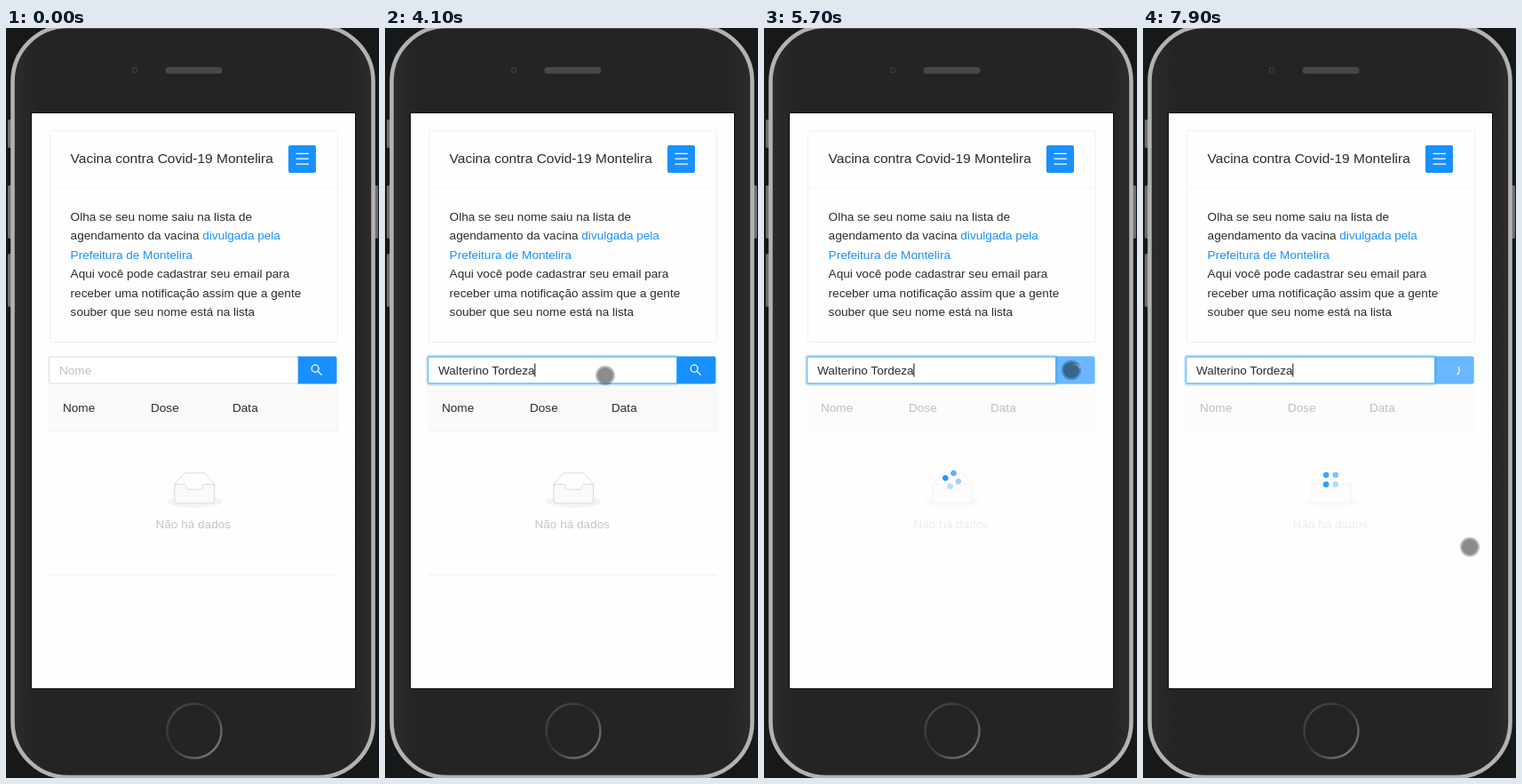
Animation, 420 px wide and 844 px high, one loop 8000 ms. Source, as an HTML page:

```html
<!DOCTYPE html>
<html lang="pt-BR">
<head>
<meta charset="utf-8">
<title>Vacina</title>
<style>
  html, body { margin: 0; width: 100%; height: 100%; overflow: hidden; background: #16181a; }
  svg { display: block; width: 420px; height: 844px; }
  text { font: 13.59px "Liberation Sans", Arial, sans-serif; fill: #2b2b2b; white-space: pre; }
  .title { font-size: 15.53px; }
  .link { fill: #1890ff; }
  .hint { fill: #bfbfbf; }
  .line { fill: none; stroke: #f0f0f0; }
  .icon { fill: none; stroke: #fff; stroke-width: 1.3; }
</style>
</head>
<body>
<svg viewBox="0 0 420 844">
  <defs>
    <linearGradient id="bezel">
      <stop offset="0" stop-color="#2c2c2c"/><stop offset=".07" stop-color="#242424"/>
      <stop offset=".93" stop-color="#242424"/><stop offset="1" stop-color="#2c2c2c"/>
    </linearGradient>
    <linearGradient id="ring" x1="0" y1="0" x2="1" y2="1">
      <stop offset="0" stop-color="#505050"/><stop offset=".42" stop-color="#303030"/>
      <stop offset=".6" stop-color="#4a4a4a"/><stop offset="1" stop-color="#8a8a8a"/>
    </linearGradient>
  </defs>

  <!-- phone -->
  <g fill="#6f6f6f">
    <rect x="2" y="103" width="5" height="32" rx="2"/>
    <rect x="2" y="177" width="5" height="60" rx="2"/>
    <rect x="2" y="254" width="5" height="60" rx="2"/>
    <rect x="414" y="177" width="5" height="60" rx="2"/>
  </g>
  <rect x="7.5" y="-2" width="406" height="845" rx="62" fill="url(#bezel)" stroke="#b2b2b2" stroke-width="4.6"/>
  <circle cx="145" cy="47.5" r="3.5" fill="#383838"/><circle cx="145" cy="47.5" r="1.5" fill="#1c1c1c"/>
  <rect x="179.5" y="44" width="64" height="7.5" rx="3.7" fill="#474747"/>
  <circle cx="212" cy="791" r="30.5" fill="none" stroke="url(#ring)" stroke-width="2.4"/>
  <rect x="28" y="95" width="366" height="649" fill="#0b0b0b"/>
  <rect x="29" y="96" width="364" height="647" fill="#fefefe"/>

  <!-- card -->
  <rect class="line" x="49.5" y="115.5" width="324" height="238" rx="2"/>
  <path class="line" d="M50 179.5H373" stroke-opacity=".6"/>
  <text class="title" x="72.6" y="152">Vacina contra Covid-19 Montelira</text>
  <rect x="318" y="132" width="31" height="31" rx="2" fill="#1890ff"/>
  <path class="icon" d="M326.5 141.3h14.4m-14.4 5.9h14.4m-14.4 5.9h14.4"/>
  <g id="intro"></g>

  <!-- table -->
  <g id="table">
    <rect x="48" y="402" width="327" height="51.5" fill="#f9f9f9"/>
    <path class="line" d="M48 453.5H375M48 615.5H374"/>
    <text x="64" y="432">Nome</text>
    <text x="163" y="432">Dose</text>
    <text x="255" y="432">Data</text>
    <g transform="translate(181.3 500.9) scale(.97)" stroke="#d9d9d9">
      <ellipse cx="32" cy="33" rx="32" ry="7" fill="#f3f3f3" stroke="none"/>
      <path fill="#fefefe" d="M55 12.8L44.9 1.3Q44 0 42.9 0H21.1Q20 0 19.1 1.3L9 12.8V22H55Z"/>
      <path fill="#fafafa" d="M41.6 15.9Q41.8 13 43.8 13H55V31Q55 35 52 35H12Q9 35 9 31V13H20.2Q22.4 13 22.4 16T24.6 18.9H39.4Q41.6 18.9 41.6 15.9Z"/>
    </g>
    <text x="168.5" y="563" style="fill:#c4c4c4">Não há dados</text>
  </g>
  <g id="dots" fill="#1890ff"></g>

  <!-- search -->
  <path d="M328 369.5H370.5a2 2 0 0 1 2 2V398.5a2 2 0 0 1-2 2H328Z" fill="#1890ff"/>
  <path id="veil" d="M328 369.5H370.5a2 2 0 0 1 2 2V398.5a2 2 0 0 1-2 2H328Z" fill="#fff"/>
  <path id="lens" class="icon" d="M352.2 383.2a4 4 0 1 0-8 0a4 4 0 1 0 8 0M351.2 386.2L355.6 390.6"/>
  <path id="arc" class="icon" d="M350 378.8A6.2 6.2 0 0 1 356.2 385" stroke-width="1.1"/>
  <rect x="48.5" y="370" width="280" height="30" rx="1.5" fill="#fff" stroke="#dcdcdc"/>
  <g id="focus" fill="none">
    <rect x="47.5" y="369" width="282" height="32" rx="2.5" stroke="#1890ff" stroke-opacity=".22" stroke-width="3"/>
    <rect x="48.5" y="370" width="280" height="30" rx="1.5" stroke="#52b2ff"/>
  </g>
  <text id="hint" class="hint" x="60" y="390">Nome</text>
  <text id="typed" x="60" y="390"></text>
  <rect id="caret" y="377.5" width="1.1" height="15" fill="#222"/>

  <!-- pointer -->
  <g id="touch">
    <circle r="11" fill="#000" fill-opacity=".26"/>
    <circle r="9" fill="#000" fill-opacity=".26"/>
  </g>
  <path id="cross" stroke="#fff" stroke-width="1.4" paint-order="stroke"
    d="M0-7.5L3-4H1V-1H4V-3L7.5 0L4 3V1H1V4H3L0 7.5L-3 4H-1V1H-4V3L-7.5 0L-4-3V-1H-1V-4H-3Z"/>
</svg>
<script>
const LOOP = 8000, STEP = 100, LOADING = 4750;
const NAME = 'Walterino Tordeza';
// [time, letters typed]
const KEYS = [[1200, 1], [1500, 2], [1700, 4], [1900, 5], [2000, 6], [2300, 9], [2600, 10],
  [2800, 11], [3000, 12], [3200, 13], [3300, 14], [3600, 15], [3700, 17]];
// [time, x, y]
const PATH = [[100, 396, 438], [600, 228, 392], [2800, 228, 392], [2900, 307, 391], [3000, 248, 391],
  [4100, 248, 391], [4600, 346, 385], [5900, 346, 385], [6300, 374, 587], [6800, 374, 587], [7000, 368, 584]];
const INTRO = ['Olha se seu nome saiu na lista de',
  'agendamento da vacina <tspan class="link">divulgada pela</tspan>',
  '<tspan class="link">Prefeitura de Montelira</tspan>',
  'Aqui você pode cadastrar seu email para',
  'receber uma notificação assim que a gente',
  'souber que seu nome está na lista'];

const $ = id => document.getElementById(id);
const clamp = v => Math.min(1, Math.max(0, v));
const ease = v => v * v * (3 - 2 * v);
const show = (id, on) => $(id).setAttribute('visibility', on ? 'visible' : 'hidden');
const fade = (id, v) => $(id).setAttribute('opacity', v);

$('intro').innerHTML = INTRO.map((s, i) => `<text x="72.6" y="${217 + i * 21.4}">${s}</text>`).join('');
$('dots').innerHTML = [[-1, -1], [1, -1], [1, 1], [-1, 1]]
  .map(([x, y]) => `<circle cx="${x * 5.34}" cy="${y * 5.34}" r="3.3"/>`).join('');

function pointerAt(t) {
  const i = PATH.findIndex(p => p[0] > t);
  if (i < 0) return PATH[PATH.length - 1].slice(1);
  const [a, b] = [PATH[Math.max(0, i - 1)], PATH[i]];
  const k = ease(clamp((t - a[0]) / (b[0] - a[0])));
  return [1, 2].map(n => a[n] + (b[n] - a[n]) * k);
}

function drawInput(t) {
  const count = KEYS.reduce((n, [at, letters]) => t >= at ? letters : n, 0);
  const typed = $('typed');
  typed.textContent = NAME.slice(0, count);
  show('hint', !count);
  fade('focus', clamp((t - 500) / 300));
  const lastKey = KEYS.reduce((last, [at]) => t >= at ? at : last, 600);
  show('caret', t >= 600 && (t - lastKey) % 1000 < 500);
  $('caret').setAttribute('x', 59.6 + (count ? typed.getComputedTextLength() : 0));
}

function drawLoading(t) {
  const s = (t - LOADING) / 1000, on = s >= 0, k = clamp(s / .25);
  fade('table', 1 - .7 * k);
  fade('veil', .35 * k);
  fade('dots', k);
  show('lens', !on);
  show('arc', on);
  if (!on) return;
  $('arc').setAttribute('transform', `rotate(${s * 360} 350 385)`);
  $('dots').setAttribute('transform', `translate(211.5 508.3) rotate(${45 + s * 300})`);
  [...$('dots').children].forEach((dot, i) => {
    const phase = Math.max(0, s - i * .4) % 2;
    dot.setAttribute('opacity', .3 + .7 * (phase < 1 ? phase : 2 - phase));
  });
}

function drawPointer(t) {
  const moving = t >= 2600 && t < 2900;
  show('touch', t >= 100 && !moving);
  show('cross', moving);
  const place = `translate(${pointerAt(t).join(' ')})`;
  $('touch').setAttribute('transform', place);
  $('cross').setAttribute('transform', place);
}

const start = performance.now();
function frame() {
  const t = Math.floor((performance.now() - start) % LOOP / STEP) * STEP;
  drawInput(t);
  drawLoading(t);
  drawPointer(t);
  requestAnimationFrame(frame);
}
frame();
</script>
</body>
</html>
```
